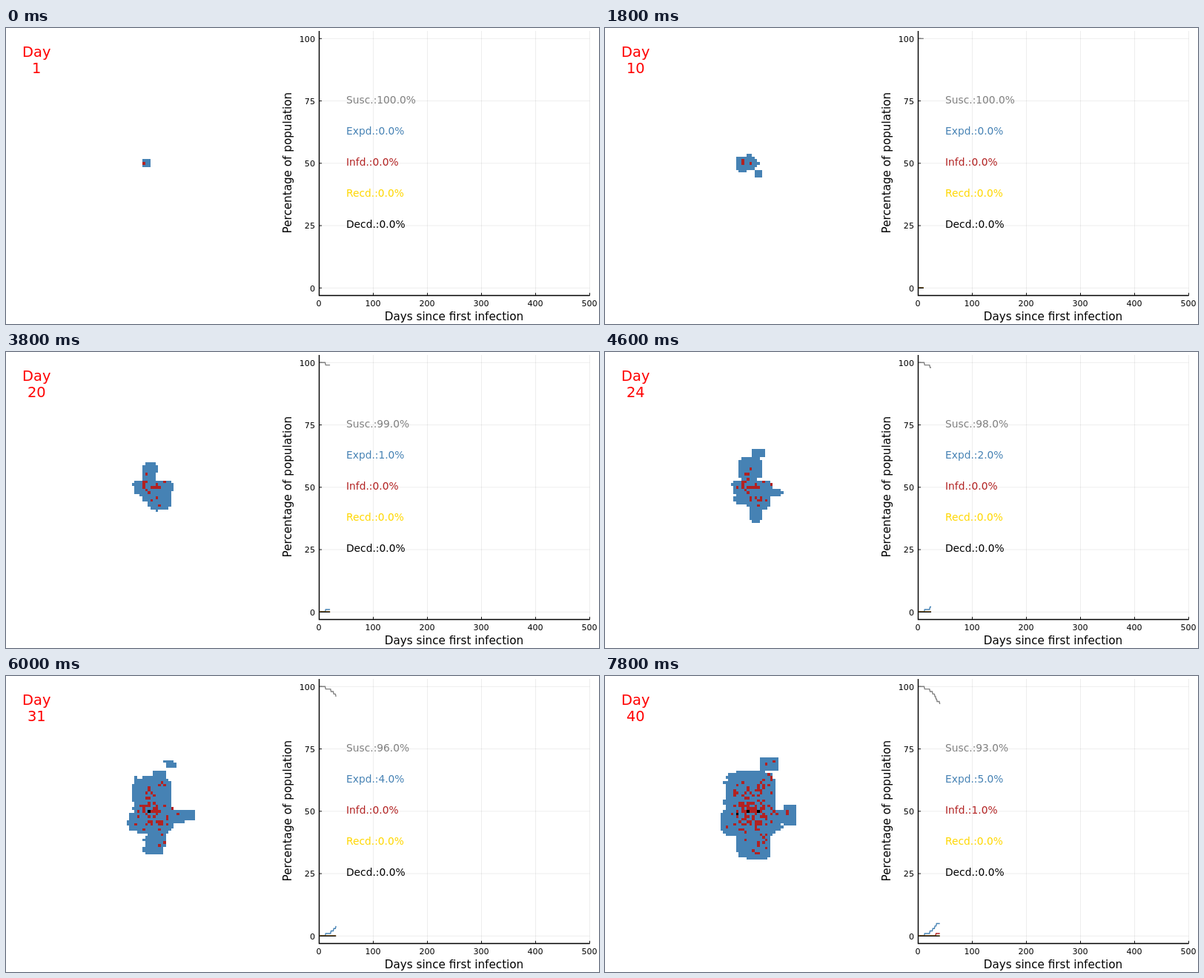
An HTML page that plays this animation: 800 px wide and 400 px high, repeating every 8 s.

```html
<!DOCTYPE html>
<html lang="en">
<head>
<meta charset="utf-8">
<title>Epidemic spread</title>
<style>
  html, body { margin: 0; width: 100%; height: 100%; overflow: hidden; background: #fff; }
  svg { display: block; width: 800px; height: 400px; font-family: "DejaVu Sans", sans-serif; }
  .cells { shape-rendering: crispEdges; }
</style>
</head>
<body>
<svg id="stage" viewBox="0 0 800 400"></svg>
<script>
const stage = document.getElementById('stage');
const DAY_MS = 200, DAYS = 40;
const BLUE = '#4682b4', RED = '#b22222', GRAY = '#808080', GOLD = '#ffd700', BLACK = '#000';

function add(name, attrs, text = '') {
  const node = document.createElementNS('http://www.w3.org/2000/svg', name);
  for (const key in attrs) node.setAttribute(key, attrs[key]);
  node.textContent = text;
  stage.append(node);
  return node;
}
const label = (text, x, y, size, anchor = 'middle', fill = BLACK, more = {}) =>
  add('text', { x, y, 'font-size': size, 'text-anchor': anchor, fill, ...more }, text);
const stroke = (d, color, width, more = {}) =>
  add('path', { d, fill: 'none', stroke: color, 'stroke-width': width, ...more });

// Outbreak lobes: column, row, radii in cells, first day and day of full size.
const lobes = [
  [1, 0, 3.9, 3.2, -1, 10],     // first cluster
  [6, 4, 4.8, 4.8, 9, 20],
  [3.5, 0, 8, 2.8, 8, 20],
  [2, -5, 2.8, 4.8, 11, 20],
  [3, -7, 10.4, 9, 19, 40],     // upper half
  [3, 4, 12.4, 5.6, 18, 40],    // lower half
  [5, 9, 4, 5.5, 20, 27],       // south
  [4, 13, 6.8, 5.6, 25, 40],
  [6, -13, 3.2, 2.8, 21, 27],   // north tip
  [10, -18, 3.6, 2.8, 26, 40],
  [11, 2, 8, 2.2, 21, 31],      // east arm
  [18, 1.5, 3, 4.2, 29, 39]
];
const deaths = { '2,0': 26, '6,0': 34, '-2,1': 35 };

const hash = (a, b) => {
  const v = Math.sin(a * 12.9898 + b * 78.233) * 43758.5453;
  return v - Math.floor(v);
};

// Lobes grow with the square root of time; noise on small blocks roughens the edge.
function exposureDay(c, r) {
  const rough = 1 + 0.12 * hash(c >> 1, r >> 1);
  const days = lobes.map(([x, y, rx, ry, from, to]) => {
    const reach = rough * (((c - x) / rx) ** 4 + ((r - y) / ry) ** 4) ** 0.25;
    return reach > 1 ? Infinity : from + (to - from) * reach ** 2;
  });
  return Math.max(1, Math.ceil(Math.min(...days)));
}

const cells = [];
for (let c = -10; c < 23; c++)
  for (let r = -21; r < 21; r++) {
    const exposed = exposureDay(c, r);
    const first = c === 0 && r === 0;
    const infected = first ? 1 : exposed + 3 + Math.floor(60 * hash(c + 0.5, r + 0.5));
    cells.push({ c, r, exposed, infected, dead: deaths[c + ',' + r] || Infinity });
  }

const edgeX = c => Math.round(184 + 3.54 * c);
const edgeY = r => Math.round(181 + 3.54 * r);
const cellPath = (state, day) => cells.filter(cell => cell[state] <= day).map(({ c, r }) =>
  `M${edgeX(c)} ${edgeY(r)}H${edgeX(c + 1)}V${edgeY(r + 1)}H${edgeX(c)}Z`).join('');
const layers = Object.entries({ exposed: BLUE, infected: RED, dead: BLACK }).map(
  ([state, fill]) => ({ state, path: add('path', { fill, class: 'cells' }) }));

label('Day', 41.3, 39, 19.44, 'middle', '#f00');
const dayLabel = label('1', 41.3, 61, 19.44, 'middle', '#f00');

// Chart
const px = day => 422.5 + day * 0.73;
const py = percent => 351.3 - percent * 3.37;
const bottom = 361.5;
const days = [0, 100, 200, 300, 400, 500], percents = [0, 25, 50, 75, 100];
const marks = (column, row) => days.map(column).join('') + percents.map(row).join('');

stroke(marks(d => `M${px(d)} 4V${bottom}`, p => `M${px(0)} ${py(p)}H${px(500)}`),
  BLACK, 0.7, { opacity: 0.1 });
stroke(marks(d => `M${px(d)} ${bottom}v-3.6`, p => `M${px(0)} ${py(p)}h3.6`), BLACK, 0.9);
stroke(`M${px(0)} 4V${bottom}H${px(500)}`, BLACK, 1.4);
for (const d of days) label(d, px(d) - 0.5, 376, 11.11);
for (const p of percents) label(p, 417, py(p) + 4.3, 11.11, 'end');
label('Days since first infection', 604.5, 395, 15.2);
label('Percentage of population', 0, 0, 15.2, 'middle', BLACK,
  { transform: 'translate(385 182.2) rotate(-90)' });

// Every series moves one percent at each listed day.
const series = [
  ['Susc.', GRAY, 100, -1, [12, 22, 27, 31, 33, 35, 40]],
  ['Expd.', BLUE, 0, 1, [12, 22, 27, 31, 34]],
  ['Infd.', RED, 0, 1, [33]],
  ['Recd.', GOLD, 0, 1, []],
  ['Decd.', BLACK, 0, 1, []]
].map(([name, color, start, step, changes], i) => ({
  name,
  value: day => start + step * changes.filter(d => d <= day).length,
  line: stroke('', color, 1.39),
  text: label('', 459, 102 + i * 42, 13.8, 'start', color)
}));

function draw(day) {
  dayLabel.textContent = day;
  for (const { state, path } of layers) path.setAttribute('d', cellPath(state, day));
  for (const { name, value, line, text } of series) {
    text.textContent = `${name}:${value(day).toFixed(1)}%`;
    let d = '';
    for (let i = 1; i <= day; i++) d += `${i > 1 ? 'L' : 'M'}${px(i)} ${py(value(i))}`;
    line.setAttribute('d', d);
  }
}

const start = performance.now();
let shown = 0;
function tick() {
  const day = 1 + Math.floor((performance.now() - start) / DAY_MS) % DAYS;
  if (day !== shown) draw(shown = day);
  requestAnimationFrame(tick);
}
tick();
</script>
</body>
</html>
```
